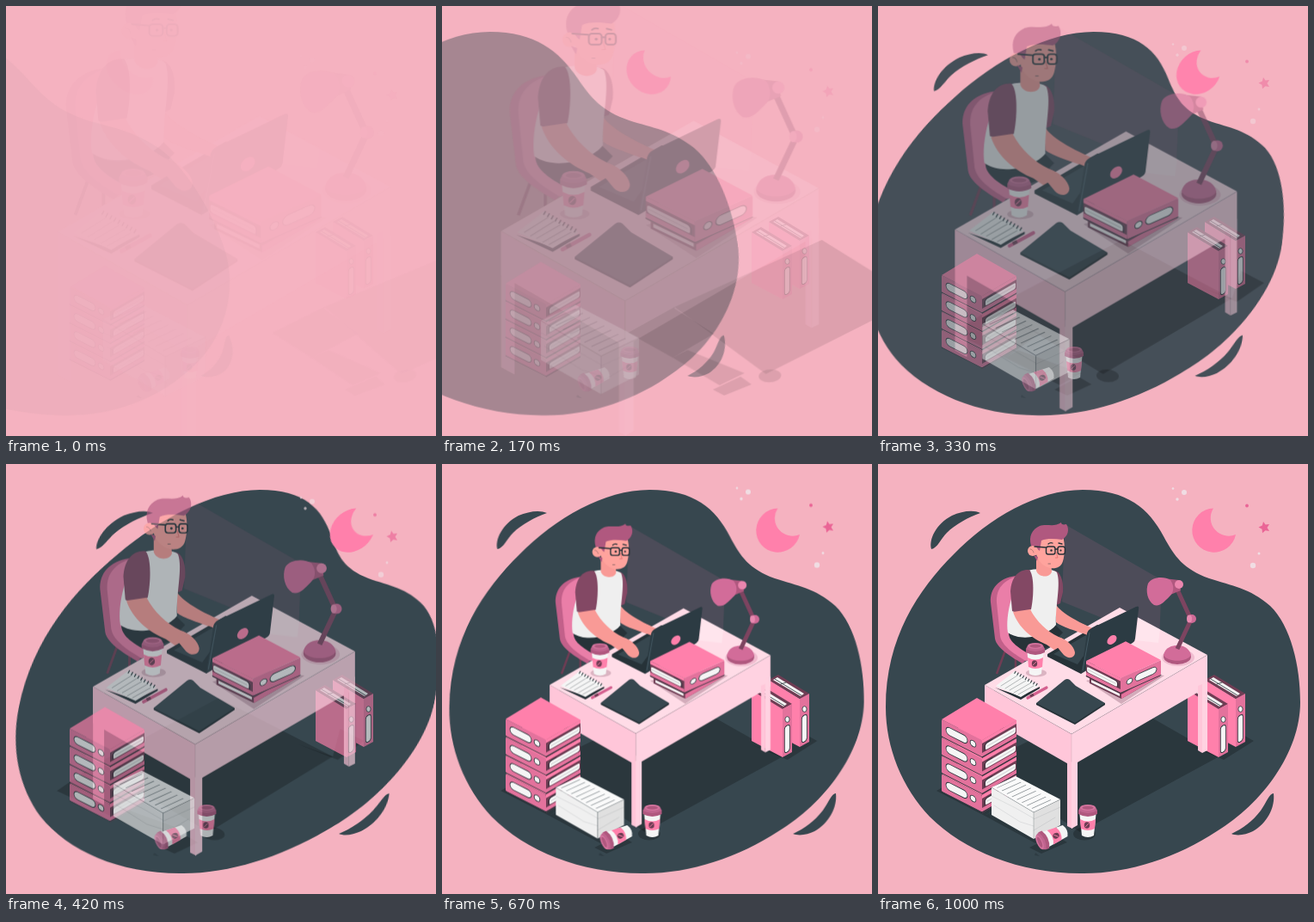
An HTML page that plays this animation: 500 by 500 pixels, repeating every 1.04 s.

```html
<!DOCTYPE html>
<html lang="en">
<head>
<meta charset="utf-8">
<title>Late night desk</title>
<style>
html, body { margin: 0; width: 100%; height: 100%; overflow: hidden; background: #f5b2c0; }
svg { display: block; width: 100vw; height: 100vh; }

/* --t is the scene time in seconds; every animation is paused and seeked by its delay */
.anim {
  animation: 1s cubic-bezier(.36, -.01, .5, 1.38) calc(var(--t, .035) * -1s) both paused;
}
.from-left  { animation-name: fromLeft; }
.from-right { animation-name: fromRight; }
.zoom  { animation-name: zoom; }
.rise  { animation-name: rise; }
.slide { animation-name: slide; }
.fade  { animation-name: fade; }
#blob   { transform-origin: 250px 253px; }
#shadow { transform-origin: 250px 365px; }
#moon   { transform-origin: 391px 77px; }
#desk   { transform-origin: 253.5px 246px; }
#papers { transform-origin: 172px 400px; }

@keyframes fromLeft {
  0%   { opacity: .03; transform: translate(-250px) skewX(20deg); }
  60%  { opacity: 1; transform: translate(0) skewX(-10deg); }
  80%  { opacity: 1; transform: translate(0) skewX(2deg); }
  100% { opacity: 1; transform: translate(0) skewX(0deg); }
}
@keyframes fromRight {
  0%   { opacity: .03; transform: translate(250px) skewX(-20deg); }
  60%  { opacity: 1; transform: translate(0) skewX(10deg); }
  80%  { opacity: 1; transform: translate(0) skewX(-2deg); }
  100% { opacity: 1; transform: translate(0) skewX(0deg); }
}
@keyframes zoom  { from { opacity: .03; transform: scale(1.5); } to { opacity: 1; transform: scale(1); } }
@keyframes rise  { from { opacity: .03; transform: translateY(30px); } to { opacity: 1; transform: translateY(0); } }
@keyframes slide { from { opacity: .03; transform: translateX(-30px); } to { opacity: 1; transform: translateX(0); } }
@keyframes fade  { from { opacity: .03; } to { opacity: 1; } }

.pink { fill: #ff80ab; }
.rose { fill: #e3729c; }
.plum { fill: #6f3d54; }
.sleeve { fill: #834864; }
.hair { fill: #b0587f; }
.dark { fill: #37474f; }
.ink  { fill: #263238; }
.white { fill: #f5f5f5; }
.skin { fill: #f99a96; }
.tag { fill: #f5f5f5; stroke: #263238; stroke-width: .8; }
.line { fill: none; stroke: #263238; stroke-width: .8; stroke-linecap: round; stroke-linejoin: round; }
</style>
</head>
<body>
<svg viewBox="0 0 500 500">
  <defs>
    <!-- lying binder, origin at the near top corner -->
    <g id="binder">
      <g transform="matrix(1 .51 0 1 -47 -24)">
        <rect class="rose" width="47" height="20" rx="1.5"/>
        <path class="line" d="M0 20H47"/>
        <rect class="tag" x="5" y="5" width="25" height="9" rx="4.5"/>
        <circle class="tag" cx="36.5" cy="9.5" r="3.4"/>
      </g>
      <g transform="matrix(1 -.575 0 1 0 0)">
        <rect class="plum" width="40" height="21"/>
        <rect class="white" x="4" y="7" width="35" height="7" rx="2"/>
        <path class="line" d="M6 10.500H38" stroke-opacity=".25"/>
        <rect class="pink" width="40" height="4"/>
        <rect class="rose" y="15" width="40" height="4.500"/>
        <path class="line" d="M0 20H40M3 14V9Q4 6 7 6H12"/>
      </g>
      <path class="pink" d="M0 0L-47 -24L-6 -49L40 -23Z"/>
    </g>
    <!-- standing binder -->
    <g id="folder">
      <path class="pink" d="M360 263L396 285V341L360 322Z"/>
      <path class="plum" d="M360 263L371 257L407 279L396 285Z"/>
      <path class="white" d="M365 263L370 260L401 279L397 282Z"/>
      <path class="line" d="M374 268L380 266M367 262L398 281"/>
      <path class="rose" d="M396 285L407 279V335L396 341Z"/>
      <rect class="tag" x="-3" y="0" width="6" height="31" rx="3" transform="matrix(1 -.55 0 1 401.3 304)"/>
      <ellipse class="tag" cx="401.5" cy="297" rx="2.6" ry="3.3"/>
    </g>
    <!-- cup, origin at the centre of the body -->
    <g id="cup">
      <path class="white" d="M-9.5 -9H9.5L7 16Q0 20 -7 16Z"/>
      <path class="pink" d="M-9 -3Q0 2 9 -3L8 8Q0 12 -8 8Z"/>
      <ellipse class="plum" cx="-1" cy="4" rx="3.2" ry="3.8"/>
      <path d="M-3 6L1 2" stroke="#ff80ab" stroke-width=".8"/>
      <path class="hair" d="M-11 -13V-9Q0 -3 11 -9V-13Z"/>
      <path fill="#c0658f" d="M-9 -17L-11 -13Q0 -7 11 -13L9 -17Z"/>
      <ellipse fill="#d4749e" cy="-16.5" rx="9" ry="3.4"/>
      <ellipse class="hair" cy="-16.3" rx="6.5" ry="2"/>
    </g>
  </defs>

  <g id="blob" class="anim from-left dark">
    <path d="M9 283C9 202 47 146 88 105C129 63 185 30 238 30C290 30 315 52 332 84C345 108 355 122 385 133C412 142 432 144 456 165C480 188 491 235 491 277C491 335 447 395 394 427C347 458 290 477 235 476C165 476 100 450 60 410C28 376 9 330 9 283Z"/>
    <path d="M62 99C59 88 67 70 86 60C97 55 111 53 119 57C105 62 90 70 80 80C73 87 69 98 62 99Z"/>
    <path d="M460 383C462 400 452 418 436 427C428 431 418 433 411 430C424 424 436 415 445 403C452 393 455 383 460 383Z"/>
  </g>

  <g id="shadow" class="anim from-right">
    <g fill-opacity=".23">
      <path d="M278 272L397 340L235 428L118 350Z"/>
      <path d="M68 380L118 350V352L168 381L124 409Z"/>
      <path d="M360 326L397 340L412 308L437 322L402 344Z"/>
      <path d="M124 409L140 400L210 427L183 441Z"/>
      <path d="M176 446L206 431L220 440L190 453Z"/>
      <ellipse cx="240" cy="430" rx="13" ry="7.5"/>
    </g>
  </g>

  <g class="anim rise">
    <path fill="#ea6596" d="M448 67L450.5 70.5L455 70L452.5 74L455 78L450.5 77.2L447 80.3L446.5 75.7L442.5 73.5L446.8 71.5Z"/>
    <circle fill="#ea6596" cx="429" cy="48.5" r="1.9"/>
    <g fill="#f0dde3">
      <circle cx="343" cy="28.5" r="1.3"/>
      <circle cx="356" cy="33" r="3"/>
      <circle cx="348" cy="41" r="1.7"/>
      <circle cx="443" cy="104" r="1.5"/>
      <circle cx="436" cy="118" r="3.2"/>
    </g>
  </g>
  <path id="moon" class="anim from-left pink" d="M390 51.5A25.6 25.6 0 1 0 416 82A21 21 0 0 1 390 51.5Z"/>

  <g class="anim fade">
    <use href="#folder" x="20" y="-12"/>
    <use href="#folder"/>
  </g>

  <g id="desk" class="anim zoom">
    <path fill="#ff7bac" fill-opacity=".11" d="M217 70L330 135L327 206L214 160Z"/>

    <!-- chair -->
    <path d="M149 214L138 244M160 222V240" stroke="#6f3d54" stroke-width="2.5"/>
    <path fill="#c2608a" d="M160 130C140 133 130 145 131 161L136 203C138 215 158 226 168 232L172 228L156 150Z"/>
    <path fill="#ea7ea8" d="M163 130C146 135 137 145 138 161L142 200C144 212 160 222 172 229L180 226L174 150Z"/>

    <!-- table -->
    <path fill="#ffc6d9" d="M124 257L135 263V374L124 368Z"/>
    <path fill="#ffc6d9" d="M124 257L225 314V351L124 293Z"/>
    <path fill="#ffd2e1" d="M225 314L383 222V259L225 351Z"/>
    <path fill="#ffc6d9" d="M220 343L226 346V424L220 421Z"/>
    <path fill="#ffd2e1" d="M225 340L232 338V420L225 424Z"/>
    <path fill="#ffc6d9" d="M372 258L377 256V336L372 333Z"/>
    <path fill="#ffd2e1" d="M377 250L383 247V333L377 336Z"/>
    <path fill="#ffdce7" d="M124 257L281 167L383 222L225 314Z"/>
    <path class="line" d="M124 257L225 314L383 222M225 314V346" stroke-opacity=".12"/>
    <path fill="#fff" fill-opacity=".25" d="M303 179L328 192L326 208L299 205Z"/>

    <!-- worker -->
    <path class="ink" d="M152 194C151 204 158 211 176 221L200 212L215 196L205 186Z"/>
    <path class="skin" d="M206 161C208 169 226 181 252 192L246 200C230 194 213 189 207 184Z"/>
    <path class="sleeve" d="M205 124C212 125 216 135 215 149L212 162L205 165Z"/>
    <path fill="#efefef" d="M174 124C182 121 203 121 208 126C213 140 206 164 207 187C198 199 168 208 151 196C148 176 156 140 174 124Z"/>
    <path class="skin" d="M184 108V124C187 133 201 132 202 125L201 112Z"/>
    <path class="sleeve" d="M176 123C163 122 155 132 154 148L156 171C162 174 171 173 178 169C181 155 182 130 176 123Z"/>
    <path class="skin" d="M157 172C163 190 179 203 196 210L212 221C219 227 229 227 229 219C228 211 220 205 210 201C197 195 184 183 177 169Z"/>
    <path class="line" d="M215 212L222 219M220 209L226 216" stroke-opacity=".25"/>
    <path fill="#ffa39d" d="M184 88L215 84C218 94 217 106 215 113C213 120 207 122 200 121C192 119 186 113 184 105Z"/>
    <path class="hair" d="M178 95C175 84 179 76 188 72C196 69 205 74 213 68C213 70 215 71 219 70C223 76 221 84 214 88C206 87 197 86 190 89L188 101L183 97Z"/>
    <circle cx="180" cy="101" r="6" fill="#ffa39d"/>
    <path class="line" d="M177 99Q180 99 181 103" stroke-opacity=".4"/>
    <path class="hair" d="M181 106L186 108L185 113Z"/>
    <g class="line">
      <path d="M182 96L195 97M206 99H209" stroke-width="1.4"/>
      <rect x="195.500" y="96" width="10.500" height="9" rx="2.500" stroke-width="1.4"/>
      <rect x="209" y="96" width="8.500" height="9" rx="2.500" stroke-width="1.4"/>
      <path d="M198 93Q200 91 203 92M210 92L214 93" stroke-width="1.3"/>
      <path d="M198 116H200.500" stroke-opacity=".6"/>
    </g>
    <circle class="ink" cx="201.500" cy="100.500" r="1.200"/>
    <circle class="ink" cx="212.500" cy="100.500" r="1.100"/>
    <path d="M207 102L209 109H206" fill="none" stroke="#e0716f" stroke-width=".8"/>

    <!-- laptop -->
    <path class="ink" d="M197 221L255 187L266 191L262 210L236 244L197 224Z"/>
    <path class="dark" d="M204 221L252 193L247 212L232 233Z"/>
    <path class="skin" d="M206 210L216 222C221 227 229 226 229 219C228 212 220 205 212 202ZM238 186L252 193L246 200L236 196Z"/>
    <path fill="#2c3b43" d="M243 197Q244 193 248 191L300 166Q304 164 303 169L299 203Q299 206 296 208L236 244Z"/>
    <path d="M246 196L238 240" stroke="#455a64"/>
    <ellipse class="pink" cx="272" cy="204.500" rx="6.500" ry="4.400" transform="rotate(-45 272 204.500)"/>

    <!-- lamp -->
    <ellipse cx="349" cy="225" rx="19" ry="10" fill="#c2608a" fill-opacity=".25"/>
    <ellipse class="hair" cx="348" cy="224" rx="16" ry="9"/>
    <path fill="#d26c99" d="M332 222C334 213 342 211 348 211C355 211 362 214 364 222C360 231 336 231 332 222Z"/>
    <path d="M348 215L364 181L348 146" fill="none" stroke="#7d4460" stroke-width="5"/>
    <circle cx="365" cy="180" r="5" fill="#cf6b97"/>
    <ellipse cx="362" cy="180" rx="3" ry="4.500" fill="#e889b0"/>
    <path class="hair" d="M332 133L350 135L352 147L340 152Z"/>
    <circle cx="350" cy="140" r="5" fill="#ea86ae"/>
    <path fill="#d26c99" d="M314 139C318 131 333 130 340 135C345 142 344 150 339 154C333 160 328 166 321 164C313 159 311 147 314 139Z"/>

    <!-- things on the desk -->
    <path class="plum" fill-opacity=".3" d="M242 252L289 240L333 246L283 279Z"/>
    <path class="plum" d="M246 244L283 264L328 238V247L283 273L246 255Z"/>
    <path class="white" d="M248 251L281 267V270L248 254Z"/>
    <path class="rose" d="M283 268L328 242V247L283 273Z"/>
    <use href="#binder" transform="matrix(-1 0 0 .87 282 249)"/>

    <path class="ink" d="M136 260L166 274L188 261V259L166 270Z"/>
    <path class="white" d="M137 258L159 241L187 258L166 271Z"/>
    <path class="line" d="M143 258L162 246M148 261L167 249M153 263L172 252M158 266L177 255M163 268L181 258" stroke-opacity=".4"/>
    <path d="M159 242L187 258" stroke="#263238" stroke-width="3.500" stroke-dasharray="1 2.600"/>
    <path d="M174 272L196 260" stroke="#d4608f" stroke-width="3.200" stroke-linecap="round"/>
    <path d="M177 270L181 268" stroke="#6f3d54" stroke-width="3"/>
    <path class="ink" d="M184 278V280L229 303L264 280V278Z"/>
    <path class="dark" d="M184 278L217 251Q220 249 223 251L230 258L264 278L229 301Z"/>
    <ellipse class="plum" cx="184" cy="243" rx="12" ry="4.500" fill-opacity=".25"/>
    <use href="#cup" x="183" y="228"/>
  </g>

  <g class="anim rise">
    <use href="#binder" x="121" y="385"/>
    <use href="#binder" x="121" y="363.500"/>
    <use href="#binder" x="121" y="342.500"/>
    <use href="#binder" x="121" y="321"/>
  </g>

  <g id="papers" class="anim zoom">
    <path fill="#f0f0f0" d="M132 376L181 405V436L132 408Z"/>
    <path fill="#e0e0e0" d="M181 405L212 390V420L181 436Z"/>
    <path fill="#fafafa" d="M132 376L160 363L212 390L181 405Z"/>
    <path d="M3 14H49" stroke="#8b9296" stroke-width="22" stroke-dasharray=".8 5" transform="matrix(1 .59 1 -.46 132 376)"/>
    <path class="line" d="M132 386L160 400L181 412M135 397L165 416L181 421M181 413L212 399M181 426L206 411" stroke-opacity=".12"/>
    <path class="line" d="M132 376L181 405L212 390M181 405V436" stroke-opacity=".3"/>
  </g>

  <g class="anim slide">
    <path class="ink" fill-opacity=".5" d="M183 452L188 456L182 455Z"/>
    <use href="#cup" transform="translate(203 433) rotate(-114)"/>
    <use href="#cup" x="244" y="416"/>
  </g>
</svg>
<script>
const LOOP = 1040, FPS = 24, LEAD = 0.035;
const start = performance.now();

function draw(now) {
  const ms = Math.max(0, now - start) % LOOP;
  // the picture advances in steps of 1/24 s
  const step = Math.min(24, Math.floor((ms + 4) * FPS / 1000));
  document.documentElement.style.setProperty('--t', step / FPS + LEAD);
  requestAnimationFrame(draw);
}
draw(start);
</script>
</body>
</html>
```
